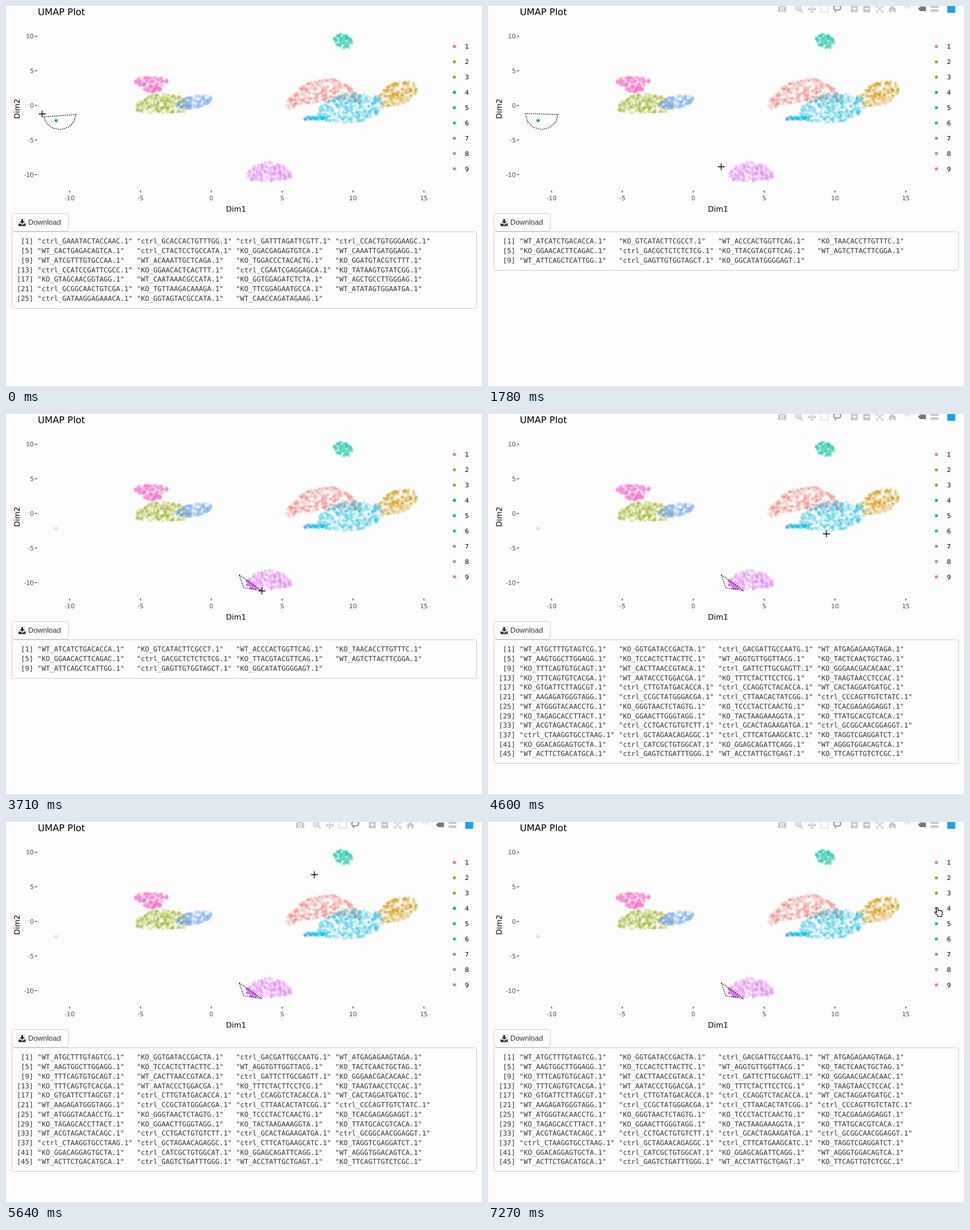
These frames come from a looping animation (837x669 px, 8 s). An HTML page with a canvas:

```html
<!DOCTYPE html>
<html lang="en">
<head>
<meta charset="utf-8">
<title>UMAP lasso selection</title>
<style>
  html, body { margin: 0; width: 100%; height: 100%; overflow: hidden; background: #fdfdfd; }
  body { position: relative; text-rendering: geometricPrecision; }
  canvas, svg.plot { position: absolute; left: 0; top: 0; }
  svg text { font-family: "DejaVu Sans", Verdana, sans-serif; }
  .tick { font-size: 10.8px; fill: #4d4d4d; }
  .name { font-size: 13.3px; }
  .button {
    position: absolute; left: 10px; top: 365px; width: 100px; height: 32px; box-sizing: border-box;
    border: 1px solid #ccc; border-radius: 4px; background: #fff; color: #333;
    font: 13px/30px "Liberation Sans", Arial, sans-serif; padding-left: 28px;
  }
  .button svg { position: absolute; left: 11px; top: 9px; }
  pre {
    position: absolute; left: 10px; top: 397px; width: 818px; box-sizing: border-box; margin: 0;
    padding: 8.4px 8px 8px; border: 1px solid #ccc; border-radius: 4px; background: #fdfdfd; color: #333;
    font: 12.09px/16.73px "DejaVu Sans Mono", monospace;
  }
</style>
</head>
<body>
<canvas id="dots" width="837" height="669"></canvas>
<div class="button">
  <svg width="13" height="13" viewBox="0 0 13 13" fill="#333">
    <path d="M4.8 0h3.4v4h2.8L6.5 8.6 2 4h2.8z"/>
    <path d="M0 8h3.6l2.9 2.6L9.4 8H13v4.4H0z"/>
    <path d="M9.3 10.6h.9M11 10.6h.9" stroke="#fff"/>
  </svg>Download
</div>
<pre id="list"></pre>
<svg class="plot" width="837" height="669">
  <text x="56" y="15.8" font-size="16.3">UMAP Plot</text>
  <text class="name" x="404.5" y="362" text-anchor="middle">Dim1</text>
  <text class="name" transform="translate(24 181) rotate(-90)" text-anchor="middle">Dim2</text>
  <g id="axes" stroke-width="1.3"></g>
  <g id="tools" fill="none" stroke="#c7c7c7" stroke-width="1.5">
    <path d="M510 1h4l1-2h4l1 2h4.5v9.5h-14.5z" fill="#c7c7c7" stroke="none"/>
    <circle cx="517" cy="5.5" r="2.7" stroke="#fdfdfd"/>
    <path d="M549 7l4 4" stroke-width="2.6"/>
    <circle cx="545.5" cy="3.5" r="4.2" stroke-width="2"/>
    <path d="M543 3.5h5M545.5 1v5" stroke-width="1.2"/>
    <path d="M564 5.5h11M569.5 0v11M565.5 3l-2.5 2.5 2.5 2.5M573.5 3l2.5 2.5-2.5 2.5M567 9l2.5 2.5 2.5-2.5"/>
    <path d="M585.5-1h12.5v12h-12.5z" stroke-dasharray="2 1.5"/>
    <path d="M610 7c-4-3-2-8 4-8 8 0 9 7 1 8-3 0-5-1-5 1 0 1 2 1 2 3" stroke="#777"/>
    <path d="M638-1h12v12h-12zM660-1h12v12h-12z" fill="#c7c7c7" stroke="none"/>
    <path d="M640.5 5h7M644 1.5v7M662.5 5h7" stroke="#fdfdfd" stroke-width="1.8"/>
    <path d="M683 3v-3.5h3.5M691-.5h3.5v3.5M694.5 7.5v3.5h-3.5M686.5 11h-3.5v-3.5M684.5 1l8.5 8.5M693 1l-8.5 8.5"/>
    <path d="M704 5.5l7-6 7 6h-1.5v5.5h-4v-4h-3v4h-4v-5.5z" fill="#c7c7c7" stroke="none"/>
    <path d="M733 1h7v4M742.5 1v1" stroke-dasharray="3 1.5"/>
    <path d="M756 5l4-4h10v8h-10z" fill="#777" stroke="none"/>
    <path d="M778-1h14v4.5h-14zM778 6h14v4.5h-14z" fill="#c7c7c7" stroke="none"/>
    <path d="M807.5-2h14v14h-14z" fill="#1aa0ef" stroke="none"/>
  </g>
  <g id="legend"></g>
  <path id="lasso" fill="none" stroke="#000" stroke-width="1.2" stroke-dasharray="2 1.7"/>
  <path id="cross" d="M-6 0h12M0-6v12" stroke="#000" stroke-width="1.3"/>
  <path id="hand" fill="#fff" stroke="#000" stroke-width="1.2" stroke-linejoin="round"
    d="M-1.5 1.5c0-2 2.7-2 2.9 0l.6 4c.4-1.4 2.3-1.3 2.500 0 .6-1 2.200-.7 2.400.5 1-.6 2 .1 2.100 1.200 .2 2.600-.4 4.600-1.200 5.900v2.400H1v-1.600C-1 12.500-2.500 10.500-4 8.700c-1-1.500.7-2.500 2-1.300l1.200 1.100z"/>
</svg>
<script>
const $ = id => document.getElementById(id);
const LOOP = 8000, STEP = 148.3;
const COLORS = ['#F8766D', '#D39200', '#93AA00', '#00BA38', '#00C19F', '#00B9E3', '#619CFF', '#DB72FB', '#FF61C3'];

// Axes and legend
const label = (x, y, s, anchor) => `<text class="tick" x="${x}" y="${y}" text-anchor="${anchor}">${s}</text>`;
let axes = '';
for (let v = -10; v <= 15; v += 5) {
  const x = 361 + v * 24.92, y = 175 - v * 12.17;
  axes += `<path d="M${x} 325v3.5" stroke="#333"/>` + label(x, 342, v, 'middle');
  if (v < 15) axes += `<path d="M51 ${y}h3.5" stroke="#333"/>` + label(49, y + 4, v, 'end');
}
$('axes').innerHTML = axes;
$('legend').innerHTML = COLORS.map((c, i) => {
  const y = 71.3 + i * 26.93;
  return `<circle cx="788.4" cy="${y}" r="2.7" fill="${c}"/><text x="807" y="${y + 4}" font-size="10.9">${i + 1}</text>`;
}).join('');

// Scatter: random points in tilted, bent ellipses
let seed = 7;
const rand = () => (seed = (seed * 16807) % 2147483647) / 2147483647;
const dots = [];
function blob(group, x, y, rx, ry, slope = 0, bend = 0) {
  const count = 4.2 * (rx * ry) ** 0.6;
  for (let i = 0; i < count; i++) {
    const r = Math.sqrt(rand()), a = rand() * 2 * Math.PI;
    const u = r * Math.cos(a), v = r * Math.sin(a);
    dots.push({ x: x + rx * u, y: y + slope * u + bend * u * u + ry * v, color: COLORS[group - 1] });
  }
}
blob(1, 556, 148, 65, 20, -7, 22);
blob(2, 688, 155, 35, 21, -10);
blob(3, 276, 171, 50, 17, 0, 8);
blob(4, 87.8, 201.7, 0.3, 0.3);
blob(5, 593, 62, 17, 12, 4);
blob(6, 606, 180, 58, 26, -6);
blob(6, 546, 197, 19, 4);
blob(7, 331, 169, 31, 11, -5);
blob(7, 527, 199, 3, 1.5);
blob(8, 462, 292, 40, 17, 0, 6);
blob(9, 255, 133, 30, 9);
blob(9, 257, 146, 16, 6);

const ctx = $('dots').getContext('2d');
function drawDots(region) {
  ctx.clearRect(0, 0, 837, 669);
  for (const d of dots) {
    ctx.globalAlpha = ctx.isPointInPath(region, d.x, d.y) ? 1 : 0.23;
    ctx.fillStyle = d.color;
    ctx.beginPath();
    ctx.arc(d.x, d.y, 2.7, 0, 7);
    ctx.fill();
  }
}

// Printed cell names: leading letter w, k or c gives the sample
const SAMPLE = { w: 'WT_', k: 'KO_', c: 'ctrl_' };
function printout(cells) {
  const words = cells.trim().split(/\s+/).map(s => `"${SAMPLE[s[0]]}${s.slice(1)}.1"`);
  let out = '';
  for (let i = 0; i < words.length; i += 4) {
    out += `[${i + 1}]`.padStart(4) + ' ' + words.slice(i, i + 4).map(s => s.padEnd(23)).join(' ') + '\n';
  }
  return out.trimEnd();
}
const LISTS = [`
  cGAAATACTACCAAC cGCACCACTGTTTGG cGATTTAGATTCGTT cCCACTGTGGGAAGC
  wCACTGAGACAGTCA cCTACTCCTGCCATA kGGACGAGAGTGTCA wCAAATTGATGGAGG
  wATCGTTTGTGCCAA wACAAATTGCTCAGA kTGGACCCTACACTG kGGATGTACGTCTTT
  cCCATCCGATTCGCC kGGAACACTCACTTT cCGAATCGAGGAGCA kTATAAGTGTATCGG
  kGTAGCAACGGTAGG wCAATAAACGCCATA kGGTGGAGATCTCTA wAGCTGCCTTGGGAG
  cGCGGCAACTGTCGA kTGTTAAGACAAAGA kTTCGGAGAATGCCA wATATAGTGGAATGA
  cGATAAGGAGAAACA kGGTAGTACGCCATA wCAACCAGATAGAAG`, `
  wATCATCTGACACCA kGTCATACTTCGCCT wACCCACTGGTTCAG kTAACACCTTGTTTC
  kGGAACACTTCAGAC cGACGCTCTCTCTCG kTTACGTACGTTCAG wAGTCTTACTTCGGA
  wATTCAGCTCATTGG cGAGTTGTGGTAGCT kGGCATATGGGGAGT`, `
  wATGCTTTGTAGTCG kGGTGATACCGACTA cGACGATTGCCAATG wATGAGAGAAGTAGA
  wAAGTGGCTTGGAGG kTCCACTCTTACTTC wAGGTGTTGGTTACG kTACTCAACTGCTAG
  kTTTCAGTGTGCAGT wCACTTAACCGTACA cGATTCTTGCGAGTT kGGGAACGACACAAC
  kTTTCAGTGTCACGA wAATACCCTGGACGA kTTTCTACTTCCTCG kTAAGTAACCTCCAC
  kGTGATTCTTAGCGT cCTTGTATGACACCA cCCAGGTCTACACCA wCACTAGGATGATGC
  wAAGAGATGGGTAGG cCCGCTATGGGACGA cCTTAACACTATCGG cCCCAGTTGTCTATC
  wATGGGTACAACCTG kGGGTAACTCTAGTG kTCCCTACTCAACTG kTCACGAGAGGAGGT
  kTAGAGCACCTTACT kGGAACTTGGGTAGG kTACTAAGAAAGGTA kTTATGCACGTCACA
  wACGTAGACTACAGC cCCTGACTGTGTCTT cGCACTAGAAGATGA cGCGGCAACGGAGGT
  cCTAAGGTGCCTAAG cGCTAGAACAGAGGC cCTTCATGAAGCATC kTAGGTCGAGGATCT
  kGGACAGGAGTGCTA cCATCGCTGTGGCAT kGGAGCAGATTCAGG wAGGGTGGACAGTCA
  wACTTCTGACATGCA cGAGTCTGATTTGGG wACCTATTGCTGAGT kTTCAGTTGTCTCGC`].map(printout);

// Pointer stops as [step, x, y], with eased travel between them
const STOPS = [
  [0, 63.5, 190], [4, 63.5, 190], [12, 410, 283], [15, 410, 283], [20, 418, 306],
  [23, 446, 310], [25, 450, 311.5], [27, 451, 311], [31, 595, 211], [34, 750, 298],
  [35, 388, 198], [37, 522, 80], [43, 793.5, 252], [45, 797, 271], [49, 790, 151],
];
function pointer(k) {
  const i = STOPS.findIndex(s => s[0] > k);
  if (i < 0) return STOPS[STOPS.length - 1].slice(1);
  const [k0, x0, y0] = STOPS[i - 1], [k1, x1, y1] = STOPS[i];
  const p = (k - k0) / (k1 - k0), e = p * p * (3 - 2 * p);
  return [x0 + (x1 - x0) * e, y0 + (y1 - y0) * e];
}

// Moments, in steps
const RELEASE = 5, DRAG = 16, LAST = 25, DROP = 27, HAND = 41;

function lassoPoints(k) {
  const points = [];
  if (k < DRAG) {
    const sweep = Math.PI * (k < 1 ? 0.95 : 1.02);
    for (let i = 0; i <= 6; i++) {
      const a = sweep * i / 6;
      points.push([94.5 + 28.5 * Math.cos(a), 191 + 26.5 * Math.sin(a)]);
    }
  } else {
    for (let i = DRAG - 1; i <= Math.min(k, LAST); i++) points.push(pointer(i));
  }
  return points;
}

function render(k) {
  const hand = k >= HAND;
  $('cross').style.display = hand ? 'none' : '';
  $('hand').style.display = hand ? '' : 'none';
  $(hand ? 'hand' : 'cross').setAttribute('transform', `translate(${pointer(k)})`);

  const dragging = k < RELEASE || (k >= DRAG && k < DROP);
  $('tools').style.display = dragging ? 'none' : '';

  const shape = 'M' + lassoPoints(k).join(' ') + 'z';
  $('lasso').setAttribute('d', shape);
  drawDots(new Path2D(shape));
  $('list').textContent = LISTS[k <= RELEASE ? 0 : k <= DROP ? 1 : 2];
}

let shown = -1;
function tick() {
  const k = Math.floor(performance.now() % LOOP / STEP);
  if (k !== shown) render(shown = k);
  requestAnimationFrame(tick);
}
tick();
</script>
</body>
</html>
```
